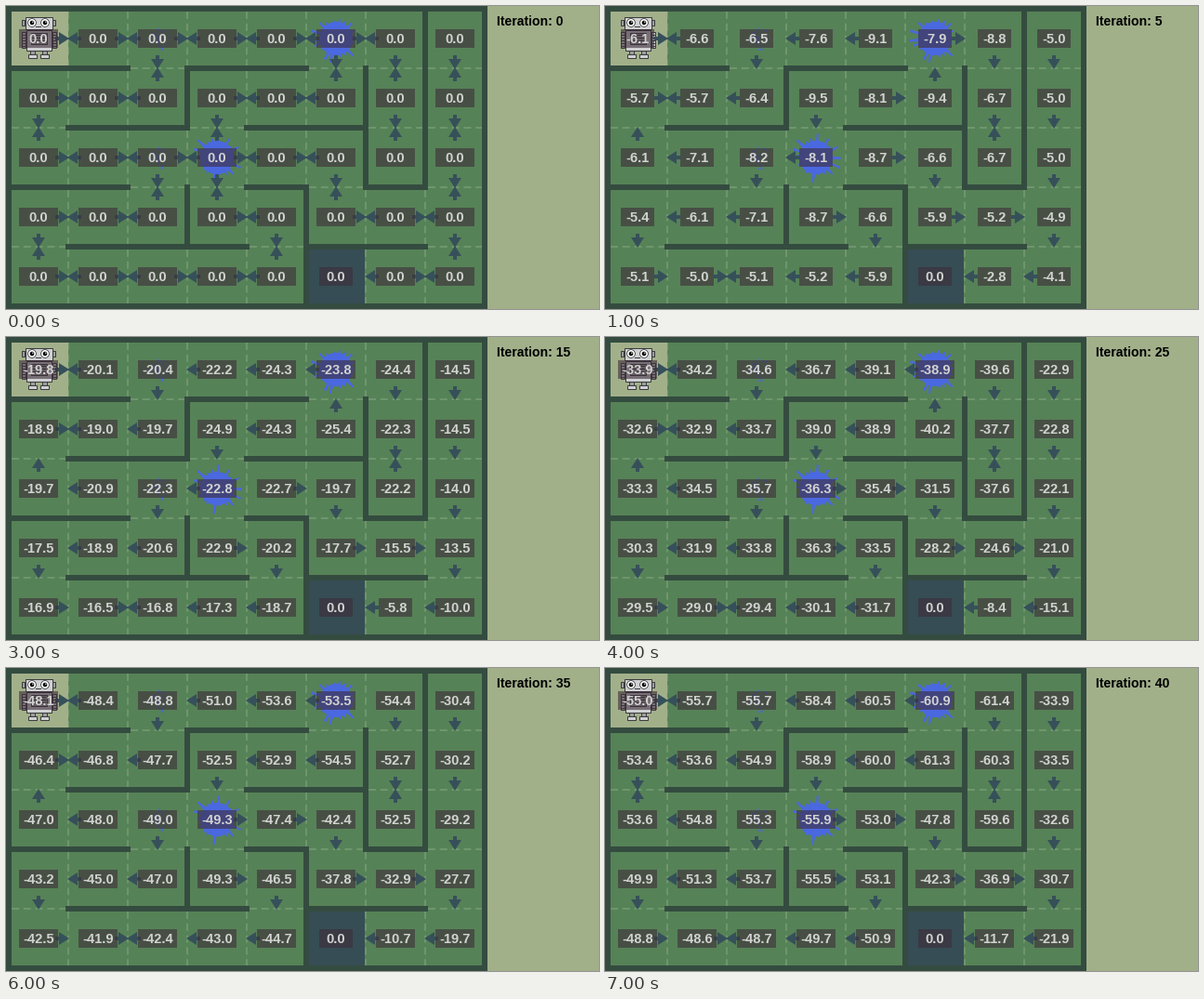
Write a matplotlib script that moves like this. It is 638 by 326 pixels and loops after 8 s.

```python
import math
import random

import matplotlib.pyplot as plt
from matplotlib.animation import FuncAnimation
from matplotlib.patches import Circle, Ellipse, Polygon, Rectangle

W, H, DPI = 638, 326, 64
CELL, EDGE = 64, 3
ROWS, COLS = 5, 8
PT = 72 / DPI

GRASS, SAND, WALL = "#568257", "#a2b08a", "#344c40"
DASH, GOAL, ARROW = "#749c72", "#364d55", "#36505a"
SLIME, LABEL, INK = "#4a68e0", "#3d2d39", "#d2d3d0"
DARK, MID, PALE = "#3c3c3e", "#9a9b9d", "#cfd0d2"

GOAL_CELL = (4, 5)
PUDDLES = [(0, 5), (2, 3)]
DRIPS = [(0, 2), (2, 2)]
STEPS = [0, 5, 10, 15, 25, 30, 35, 40]

# Walls as (x0, y0, x1, y1) in cell units
WALLS = [
    (0, 1, 2, 1), (3, 1, 5, 1), (1, 2, 3, 2), (4, 2, 6, 2),
    (0, 3, 2, 3), (4, 3, 5, 3), (6, 3, 7, 3), (1, 4, 4, 4), (5, 4, 7, 4),
    (3, 1, 3, 2), (3, 3, 3, 4), (5, 3, 5, 5), (6, 1, 6, 3), (7, 0, 7, 3),
    (0, 0, 8, 0), (0, 5, 8, 5), (0, 0, 0, 5), (8, 0, 8, 5),
]
DIRS = [(1, 0), (0, 1), (-1, 0), (0, -1)]
CELLS = [(r, c) for r in range(ROWS) for c in range(COLS)]


def is_open(cell, d):
    x, y = cell[1] + 0.5 + d[1] / 2, cell[0] + 0.5 + d[0] / 2
    return not any(x0 <= x <= x1 and y0 <= y <= y1 for x0, y0, x1, y1 in WALLS)


def step_reward(cell):
    """Reward for entering a cell."""
    return -4 if cell in PUDDLES else -2 if cell in DRIPS else -1


# Possible moves of each cell: direction -> neighbour
MOVES = {cell: {d: (cell[0] + d[0], cell[1] + d[1])
                for d in DIRS if cell != GOAL_CELL and is_open(cell, d)}
         for cell in CELLS}


def evaluate(steps):
    """Iterative evaluation of the uniformly random policy."""
    history = [dict.fromkeys(CELLS, 0.0)]
    for _ in range(steps):
        old = history[-1]
        history.append({
            cell: sum(step_reward(n) + old[n] for n in ways.values()) / max(1, len(ways))
            for cell, ways in MOVES.items()})
    return history


VALUES = evaluate(max(STEPS))


def policy(step, cell):
    """All directions at first, then only the best neighbour."""
    ways = MOVES[cell]
    if step == 0 or not ways:
        return list(ways)
    return [max(ways, key=lambda d: VALUES[step][ways[d]])]


def center(cell):
    return cell[1] * CELL + 35, cell[0] * CELL + 35


fig = plt.figure(figsize=(W / DPI, H / DPI), dpi=DPI, facecolor=SAND)
ax = fig.add_axes([0, 0, 1, 1])
ax.set_xlim(0, W)
ax.set_ylim(H, 0)
ax.axis("off")


def add(patch, z):
    patch.set_zorder(z)
    return ax.add_patch(patch)


def rect(x0, y0, x1, y1, color, z=1, alpha=1, edge="none"):
    return add(Rectangle((x0, y0), x1 - x0, y1 - y0, facecolor=color, edgecolor=edge,
                         linewidth=PT, alpha=alpha), z)


def dot(x, y, r, color, z=4):
    add(Circle((x, y), r, facecolor=color, edgecolor="none"), z)


def line(x0, y0, x1, y1, color, width, z, **kw):
    ax.plot([x0, x1], [y0, y1], color=color, lw=width * PT, zorder=z, **kw)


def draw_board():
    rect(0, 0, 518, H, GRASS)
    dashes = dict(dashes=(5, 3), dash_capstyle="butt")
    for i in range(1, COLS):
        x = EDGE + i * CELL
        line(x, 6, x, 320, DASH, 1.6, 2, **dashes)
    for i in range(1, ROWS):
        y = EDGE + i * CELL
        line(6, y, 512, y, DASH, 1.6, 2, **dashes)
    rect(6, 6, 67, 67, SAND, 2.5)
    rect(324, 260, 386, 321, GOAL, 2.5)
    for wall in WALLS:
        line(*(EDGE + CELL * v for v in wall), WALL, 6, 3, solid_capstyle="projecting")


def splat(cell, seed):
    rng = random.Random(seed)
    cx, cy = center(cell)
    dot(cx, cy, 18, SLIME)
    spikes = 18
    for i in range(spikes):
        a = 2 * math.pi * (i + rng.uniform(-0.3, 0.3)) / spikes
        reach, half = rng.uniform(19, 27), rng.uniform(0.1, 0.17)
        points = [(cx + d * math.cos(t), cy + d * math.sin(t))
                  for d, t in ((15, a - half), (reach, a - 0.03),
                               (reach, a + 0.03), (15, a + half))]
        add(Polygon(points, facecolor=SLIME, edgecolor="none"), 4)
        if reach > 22:
            dot(cx + reach * math.cos(a), cy + reach * math.sin(a),
                rng.uniform(1, 1.8), SLIME)


def droplets(cell, seed):
    rng = random.Random(seed)
    cx, cy = center(cell)
    for _ in range(40):
        x, y = rng.gauss(1, 4.5), rng.gauss(0, 6)
        x, y = max(-10, min(12, x)), max(-15, min(15, y))
        add(Ellipse((cx + x, cy + y), rng.uniform(0.8, 1.8), rng.uniform(1.2, 3.5),
                    angle=rng.uniform(-30, 30), facecolor=SLIME,
                    edgecolor="none", alpha=0.85), 4)


def draw_robot():
    # Legs and feet
    for x in (26, 39):
        rect(x, 46, x + 5, 52, MID, 4, edge=DARK)
        rect(x - 2, 51.5, x + 7, 55.5, PALE, 4, edge=DARK)
    # Arms
    for x in (16.5, 49.5):
        rect(x, 28, x + 4, 45, PALE, 4, edge=DARK)
        for y in range(31, 45, 3):
            line(x, y, x + 4, y, DARK, 1, 4.1, solid_capstyle="butt")
    # Body with its panel
    rect(21.5, 25.5, 48.5, 47.5, PALE, 4.2, edge=DARK)
    rect(26.5, 28.5, 43.5, 40.5, MID, 4.2, edge=DARK)
    for y in (31, 34, 37):
        line(28, y, 42, y, DARK, 1, 4.3)
    # Head
    for x in (17, 50):
        rect(x, 15, x + 3, 21, MID, 4.2, edge=DARK)
    rect(20.5, 11.5, 49.5, 24.5, PALE, 4.3, edge=DARK)
    for x in (28, 42):
        dot(x, 18, 4.8, DARK, 4.4)
        dot(x, 18, 4, "white", 4.5)
        dot(x, 18, 2.3, "black", 4.6)
        dot(x + 0.8, 17.2, 0.7, "white", 4.7)
    rect(32, 22, 38, 23.2, DARK, 4.5)


def make_arrow(cell, d):
    cx, cy = center(cell)
    dy, dx = d
    outline = [(18, -2), (22, -2), (22, -7), (33, 0), (22, 7), (22, 2), (18, 2)]
    points = [(cx + dx * u + dy * v, cy + dy * u + dx * v) for u, v in outline]
    return add(Polygon(points, facecolor=ARROW, edgecolor="none"), 5)


def make_label(cell):
    cx, cy = center(cell)
    box = rect(cx - 18, cy - 10, cx + 18, cy + 10, LABEL, 6, alpha=0.6)
    text = ax.text(cx, cy + 5.3, "", ha="center", va="baseline", color=INK, zorder=7,
                   family="Liberation Sans", weight="bold", size=14.6 * PT)
    return box, text


draw_board()
for seed, cell in enumerate(PUDDLES, 4):
    splat(cell, seed)
for cell in DRIPS:
    droplets(cell, 2)
draw_robot()
arrows = {(cell, d): make_arrow(cell, d) for cell in CELLS for d in MOVES[cell]}
labels = {cell: make_label(cell) for cell in CELLS}
title = ax.text(528, 21, "", color="black", va="baseline", zorder=7,
                family="Liberation Sans", weight="bold", size=14 * PT)


def update(i):
    step = STEPS[i]
    title.set_text(f"Iteration: {step}")
    for cell, (box, text) in labels.items():
        word = f"{VALUES[step][cell]:.1f}"
        text.set_text(word)
        wide = cell != GOAL_CELL and (step == 0 or len(word) > 4)
        half = 21 if wide else 18
        box.set_x(center(cell)[0] - half)
        box.set_width(2 * half)
    for (cell, d), arrow in arrows.items():
        arrow.set_visible(d in policy(step, cell))
    return [title, *arrows.values()]


anim = FuncAnimation(fig, update, frames=len(STEPS), interval=1000,
                     repeat=True, repeat_delay=0, blit=False)
plt.show()
```
